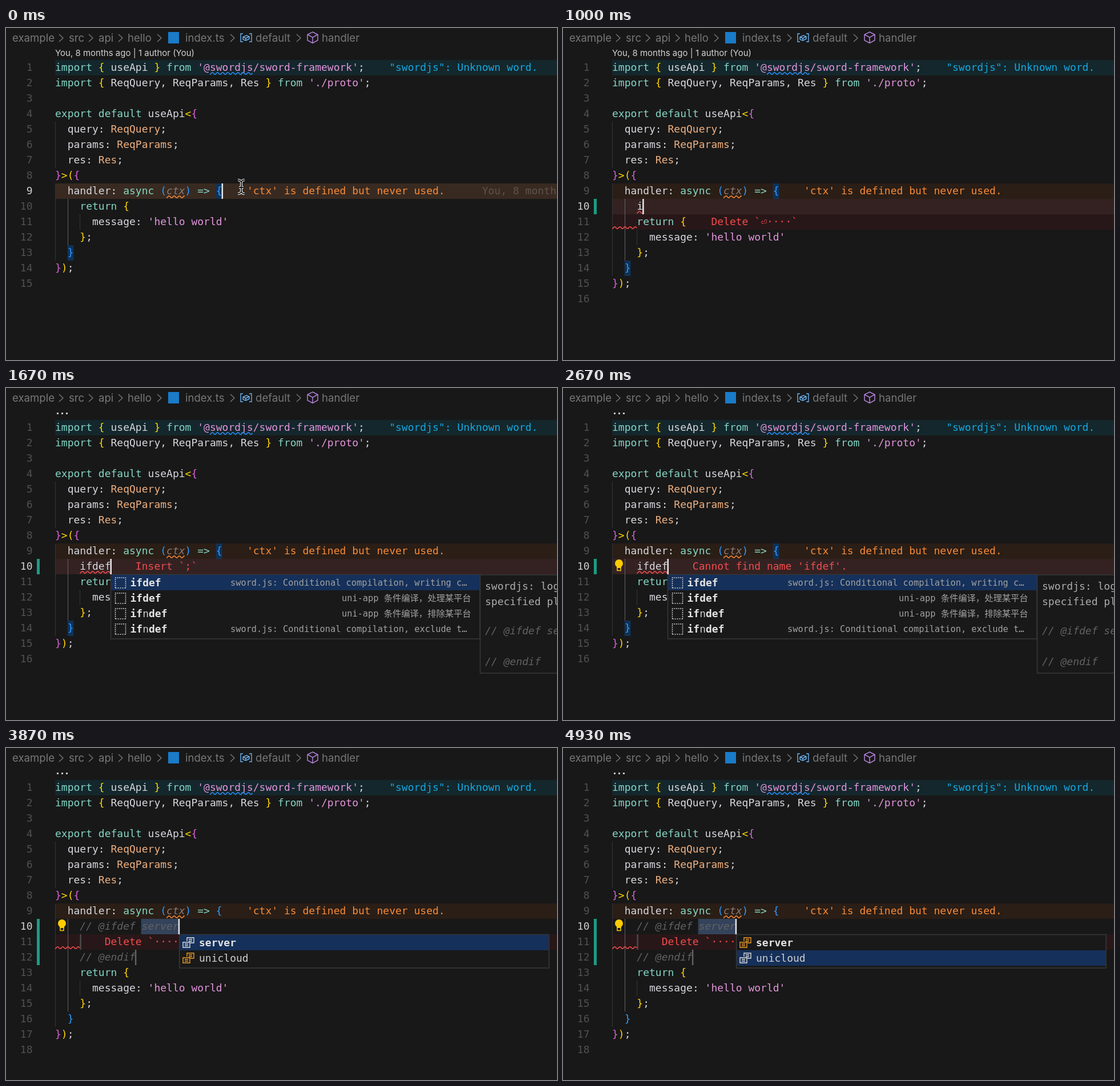
Animation, 965 px wide and 581 px high, one loop 4990 ms. Source, as an HTML page with a canvas:

```html
<!DOCTYPE html>
<html lang="en">
<head>
<meta charset="utf-8">
<title>Conditional compilation snippet</title>
<style>
html, body { margin: 0; width: 100%; height: 100%; overflow: hidden; background: #181818; }
canvas { display: block; }
</style>
</head>
<body>
<canvas id="stage" width="965" height="581"></canvas>
<script>
const g = document.getElementById('stage').getContext('2d');
const LOOP = 4990, LEFT = 86, CHAR = 10.836, ROW = 27;
const MONO = '"DejaVu Sans Mono", "Noto Sans CJK SC", monospace';
const UI = 'Inter, sans-serif';
const COLORS = {
  w: '#d6d6dd', k: '#83d6c5', s: '#e394dc', t: '#efb080',
  y: '#ffd700', p: '#da62d6', b: '#2f9bff', c: '#626262', i: '#8b7a70'
};
const ITALIC = 'ci';

const AT = {
  enter: 670, keys: [930, 1200, 1330, 1470, 1600], lint: 1000, suggest: 1130,
  lens: 1200, insertHint: 1670, bulb: 2200, accept: 3270, relint: 3870, down: 4130
};

const HEAD = [
  "~kimport ~y{~w useApi ~y} ~kfrom ~s'@swordjs/sword-framework'~w;",
  "~kimport ~y{~w ReqQuery, ReqParams, Res ~y} ~kfrom ~s'./proto'~w;",
  '',
  '~kexport default ~wuseApi~y<~p{',
  '~w  query: ~tReqQuery~w;',
  '~w  params: ~tReqParams~w;',
  '~w  res: ~tRes~w;',
  '~p}~y>(~p{',
  '~w  handler: ~kasync ~b(~ictx~b) ~k=> ~b{'
];
const TAIL = [
  '~k    return ~y{',
  "~w      message: ~s'hello world'",
  '~y    }~w;',
  '~b  }',
  '~p}~y)~w;',
  ''
];
const SUGGESTIONS = [
  ['ifdef', 'sword.js: Conditional compilation, writing c…', 393],
  ['ifdef', 'uni-app 条件编译，处理某平台', 588],
  ['ifndef', 'uni-app 条件编译，排除某平台', 588],
  ['ifndef', 'sword.js: Conditional compilation, exclude t…', 393]
];

const colX = col => LEFT + col * CHAR;
const rowY = row => 56 + (row - 1) * ROW;

function rect(x, y, w, h, color) {
  g.fillStyle = color;
  g.fillRect(x, y, w, h);
}

function text(str, x, y, color, size = 18, style = '', family = MONO) {
  g.font = `${style} ${size}px ${family}`;
  g.fillStyle = color;
  g.fillText(str, x, y);
}

function path(d, color, width = 1.5) {
  g.strokeStyle = color;
  g.lineWidth = width;
  g.stroke(new Path2D(d));
}

function codeLine(src, row) {
  let col = 0;
  for (const part of src.split('~').slice(1)) {
    const key = part[0], str = part.slice(1);
    text(str, colX(col), rowY(row) + 19, COLORS[key], 18, ITALIC.includes(key) ? 'italic' : '');
    col += str.length;
  }
}

const band = (row, color) => rect(LEFT, rowY(row), 965 - LEFT, ROW, color);
const guide = (col, from, to, color = '#343434') =>
  rect(Math.round(colX(col)), rowY(from), 1, (to - from + 1) * ROW, color);
const note = (str, col, row, color) => text(str, colX(col + 4), rowY(row) + 19, color);
const caret = (col, row) => rect(colX(col) - 1, rowY(row), 2.5, ROW, '#e8e8e8');

function squiggle(from, to, row, color) {
  const x0 = colX(from), x1 = colX(to), y = rowY(row) + 23.5;
  g.beginPath();
  for (let x = x0; x <= x1; x++) g.lineTo(x, y + 1.7 * Math.cos((x - x0) * Math.PI / 4.5));
  g.strokeStyle = color;
  g.lineWidth = 1.5;
  g.stroke();
}

function breadcrumbs() {
  const gray = '#777';
  const crumbs = { example: 11, src: 110, api: 162, hello: 213, 'index.ts': 314, default: 437, handler: 553 };
  for (const name in crumbs) text(name, crumbs[name], 24, gray, 18.6, '', UI);
  for (const x of [93, 145, 197, 265, 393, 509]) path(`M${x} 11l7 6.5l-7 6.5`, gray, 1.4);
  rect(284, 7, 19, 20, '#1a7bc8');
  path('M415 10h-4v14h4M426 10h4v14h-4M415 16l6-3l5 2v4l-6 3l-5-2zM415 16l5 2l6-3M420 18v4', '#6cb2ee', 1.4);
  path('M537 7l9 4.5v10l-9 5l-9-5v-10zM528 11.5l9 5l9-5M537 16.5v10', '#b180d7');
}

function codeLens(collapsed) {
  if (!collapsed) return text('You, 8 months ago | 1 author (You)', LEFT, 49, '#d2d2d2', 15, '', UI);
  for (const x of [89, 97, 105]) rect(x, 43, 3, 3, '#c4c4c4');
}

function bulb() {
  g.fillStyle = '#ffcc00';
  g.beginPath();
  g.arc(98, 307, 7, 0, 7);
  g.fill();
  rect(94, 311, 8, 4, '#ffcc00');
  path('M95 315v4.5h6v-4.5', '#ffcc00');
}

function mouse() {
  const d = 'M406 266q5 0 6 4q1-4 6-4M412 270v16M406 290q5 0 6-4q1 4 6 4M408 279h8';
  path(d, '#fff', 4);
  path(d, '#111', 1.8);
}

function panel(x, y, w, h) {
  rect(x, y, w, h, '#191919');
  g.strokeStyle = '#383838';
  g.lineWidth = 1.5;
  g.strokeRect(x, y, w, h);
}

// Letters that match the typed word in order are bold
function matched(label, typed, x, y) {
  let next = 0;
  [...label].forEach((ch, i) => {
    const hit = ch === typed[next];
    if (hit) next++;
    text(ch, x + i * CHAR, y, hit ? '#e4e4e4' : '#cfcfcf', 18, hit ? 'bold' : '');
  });
}

function suggestList(typed) {
  const x = colX(4 + typed.length);
  panel(x, 326.5, 830 - x, 112.5);
  rect(x + 1, 327, 829 - x, ROW, '#15305a');
  SUGGESTIONS.forEach(([label, detail, detailX], i) => {
    const y = 327 + i * ROW;
    g.setLineDash([2, 1.5]);
    path(`M${x + 8} ${y + 23}v-18h18v18`, '#d0d0d0');
    g.setLineDash([2, 2]);
    path(`M${x + 8} ${y + 23}h18`, '#d0d0d0');
    g.setLineDash([]);
    matched(label, typed, x + 34, y + 20);
    text(detail, detailX, y + 19, '#a2a2a2', 15.3);
  });
  panel(830.5, 327, 150, 172);
  text('swordjs: logic', 839, 353, '#acacac');
  text('specified platform', 839, 380, '#acacac');
  text('// @ifdef server', 839, 431, COLORS.c, 18, 'italic');
  text('// @endif', 839, 485, COLORS.c, 18, 'italic');
}

function platformList(selected) {
  const x = colX(20) + 1;
  panel(x, 326.5, 951 - x, 58.5);
  rect(x + 1, 327 + selected * ROW, 949 - x, ROW, '#15305a');
  ['server', 'unicloud'].forEach((label, i) => {
    const y = 327 + i * ROW;
    path(`M317 ${y + 11}v-6h12v9h-6M320 ${y + 8}h6M320 ${y + 11}h6M310 ${y + 13}h12v9h-12zM313 ${y + 16}h6M313 ${y + 19}h6`,
      i === selected ? '#dedede' : '#ee9d28', 1.4);
    matched(label, i ? '' : 'server', 338, y + 20);
  });
}

function draw(t) {
  const entered = t >= AT.enter, accepted = t >= AT.accept;
  const linted = t >= AT.lint && !accepted, clean = t >= AT.relint;
  const typed = 'ifdef'.slice(0, AT.keys.filter(k => t >= k).length);
  const red = '#f14c4c', orange = '#f88a36';
  const middle = accepted ? ['~c    // @ifdef server', '', '~c    // @endif']
    : entered ? ['~w    ' + typed] : [];
  const lines = [...HEAD, ...middle, ...TAIL];
  const body = 10 + middle.length, current = entered ? 10 : 9;
  const deleteHint = accepted || linted && t < AT.insertHint;

  rect(0, 0, 965, 581, '#181818');
  breadcrumbs();
  codeLens(t >= AT.lens);

  band(1, '#14272c');
  band(9, entered ? '#2a1e16' : '#382a21');
  if (linted) band(10, '#342223');
  else if (accepted && !clean) band(10, '#28181a');
  if (deleteHint) band(11, '#281719');

  guide(0, 5, 7);
  guide(0, 9, body + 3);
  guide(2, 10, body + 2, '#626262');
  guide(4, body + 1, body + 1);

  if (!accepted) {
    rect(colX(26), rowY(9), CHAR, ROW, '#103257');
    rect(colX(2), rowY(body + 3), CHAR, ROW, '#103257');
  } else {
    rect(colX(14) - 1, rowY(10), 6 * CHAR + 1, ROW, '#34435b');
    rect(colX(4), rowY(11), 2.5, ROW, '#4a4a4a');
    rect(colX(13) - 1, rowY(12), 2.5, ROW, '#626262');
  }
  if (entered) rect(54, rowY(10), 5, ROW * (clean ? 3 : 1), '#1b9c85');

  g.textAlign = 'right';
  lines.forEach((_, i) => text(i + 1, 46.5, rowY(i + 1) + 19, i + 1 === current ? '#cfcfcf' : '#505050'));
  g.textAlign = 'left';
  lines.forEach((src, i) => codeLine(src, i + 1));

  squiggle(25, 32, 1, '#2a8cf0');
  squiggle(18, 21, 9, orange);
  note('"swordjs": Unknown word.', 50, 1, '#14a8e0');
  note("'ctx' is defined but never used.", 27, 9, orange);
  if (!entered) text('You, 8 months ago', colX(69), rowY(9) + 19, '#5d534c');

  if (linted) squiggle(4, 4 + typed.length, 10, red);
  if (accepted && !clean) squiggle(4, 9, 10, red);
  if (deleteHint) {
    squiggle(0, 4, 11, red);
    note(accepted ? 'Delete `····`' : 'Delete `⏎····`', accepted ? 4 : 12, 11, red);
  }
  if (t >= AT.bulb && !clean) note("Cannot find name 'ifdef'.", accepted ? 20 : 9, 10, red);
  else if (t >= AT.insertHint && !accepted) note('Insert `;`', 9, 10, red);

  if (t >= AT.bulb) bulb();
  if (accepted) platformList(t >= AT.down ? 1 : 0);
  else if (t >= AT.suggest) suggestList(typed);

  caret(accepted ? 20 : entered ? 4 + typed.length : 27, current);
  if (!entered) mouse();
}

const start = performance.now();
function tick() {
  draw((performance.now() - start) % LOOP);
  requestAnimationFrame(tick);
}
tick();
</script>
</body>
</html>
```
